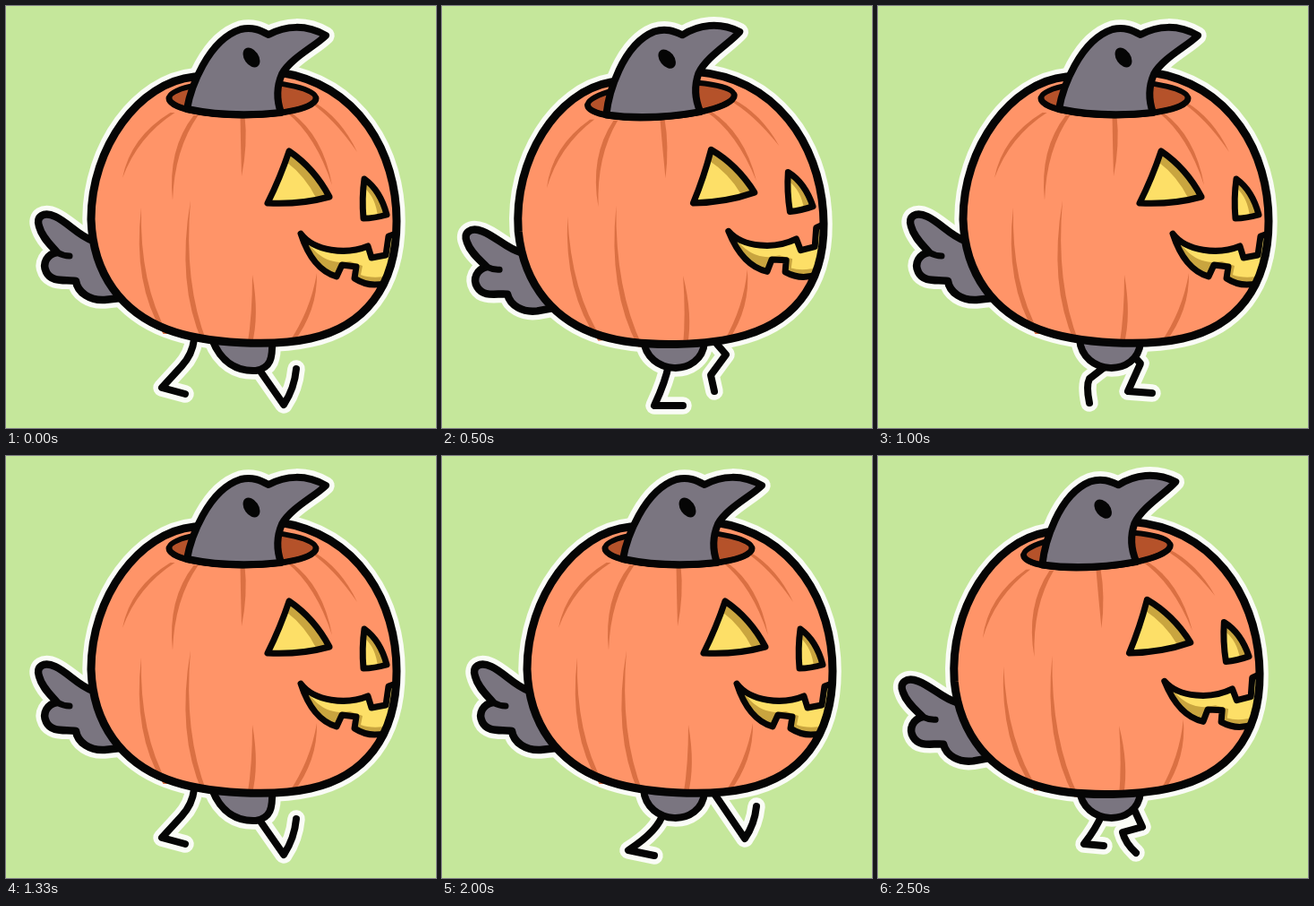
Recreate the animation shown at these times as an HTML page with a canvas. Size 480x471 px, loop 2670 ms.

```html
<!DOCTYPE html>
<html lang="en">
<head>
<meta charset="utf-8">
<title>Walking pumpkin bird</title>
<style>
html, body { margin: 0; width: 100%; height: 100%; overflow: hidden; background: #c5e79b; }
canvas { display: block; }
</style>
</head>
<body>
<canvas id="stage" width="480" height="471"></canvas>
<script>
const ctx = document.getElementById('stage').getContext('2d');
const P = d => new Path2D(d);
const INK = '#050505', GREY = '#7a7580', ORANGE = '#ff9468', CREASE = '#da7043',
  YELLOW = '#fddf67', OCHRE = '#c9a53f', HOLLOW = '#b5522a', WHITE = '#fafcf6';

const body = P('M210 79C149 85 95 157 95 238C97 300 130 342 180 361C225 378 300 380 340 371C399 358 436 315 436 240C436 165 395 88 305 74Z');
const tail = P('M97 262C80 256 70 242 55 235C42 229 33 235 37 246C40 258 50 267 57 275C46 277 40 287 45 297C51 309 66 305 78 307C80 320 94 329 110 328L128 326L150 290Z');
const tailFold = P('M57 275Q64 279 71 279');
const head = P('M202 115C206 92 225 38 262 26C275 23 284 27 293 32C312 22 335 20 357 33C345 45 318 58 308 76C302 90 302 105 307 119Q250 125 202 115Z');
const rim = P('M182 103A82 19 0 0 1 346 103A82 19 0 0 1 182 103Z');
const rimFront = P('M182 103A82 19 0 0 0 346 103');
const mouth = P('M329 254C344 274 380 278 404 268L408 281L424 278L427 257L446 250L446 300L424 309C412 313 400 311 389 304L391 291L375 289L369 302C352 297 338 282 329 254Z');
const mouthShade = P('M329 254C344 274 352 284 372 286L384 285L398 290L396 300Q408 305 430 301L420 315L365 308L338 285Z');
const eyes = [
  ['M316 162Q306 192 292 220Q328 222 361 213Q344 181 316 162Z', 'M316 162Q344 180 361 213L346 214Q334 190 313 174Z'],
  ['M400 193Q418 206 425 233Q411 237 399 237Q397 214 400 193Z', 'M400 193Q418 205 425 234L415 236Q413 214 400 203Z']
].map(pair => pair.map(P));

// tip x,y, bend x,y, base x,y of each rib
const ribs = [
  [130, 192, 143, 146, 186, 119], [186, 217, 184, 160, 212, 122],
  [263, 190, 266, 155, 264, 122], [364, 200, 350, 145, 316, 119],
  [392, 163, 370, 125, 341, 107], [151, 225, 145, 310, 178, 366],
  [206, 217, 194, 310, 222, 376], [275, 300, 279, 345, 272, 378],
  [347, 298, 344, 340, 318, 376]
].map(([x, y, cx, cy, bx, by]) =>
  P(`M${x} ${y}Q${cx - 4} ${cy} ${bx - 2.5} ${by}L${bx + 2.5} ${by}Q${cx + 4} ${cy} ${x} ${y}Z`));

const RUMP = 'M225 372C228 413 290 415 293 375Z';
const RUMP_BACK = 'M217 372C235 407 275 412 292 374Z';
const RUMP_FRONT = 'M230 372C240 398 258 408 279 407C295 404 298 394 297 372Z';

// far leg, near leg, rump for each step of the walk
const walk = [
  ['M210 372Q208 389 196 402L174 426L200 433', 'M280 402L310 445Q322 427 324 405', RUMP_FRONT],
  ['M228 380Q210 398 184 397L180 411L192 430', 'M278 400L291 412L283 446L314 447', RUMP_FRONT],
  ['M247 401L225 401Q219 410 219 428', 'M267 400L266 420L258 445L290 447', RUMP],
  ['M304 374L317 389L300 412L304 430', 'M253 400Q250 418 237 446L269 446', RUMP],
  ['M302 374L338 427Q349 411 351 391', 'M247 398Q242 418 208 440L237 446', RUMP],
  ['M314 384L329 388L319 430L347 430', 'M248 398Q236 414 205 411Q204 427 218 445', RUMP_BACK],
  ['M283 388L293 399L279 430L306 432', 'M258 399L236 416Q232 424 236 443', RUMP],
  ['M250 400Q244 415 230 433L252 435', 'M283 388L295 414L273 420Q276 432 288 443', RUMP]
].map(step => step.map(P));

// upright, leaning forward, upright, leaning back: angle and pivot
const leans = [[0, 0, 0], [4.5, 195, 395], [0, 0, 0], [-4, 285, 385]];

function line(path, width, color = INK) {
  ctx.lineWidth = width;
  ctx.strokeStyle = color;
  ctx.stroke(path);
}
function fill(path, color) {
  ctx.fillStyle = color;
  ctx.fill(path);
}
function shape(path, color, width) {
  fill(path, color);
  line(path, width);
}
function leaned([angle, x, y], paint) {
  ctx.save();
  ctx.translate(x, y);
  ctx.rotate(angle * Math.PI / 180);
  ctx.translate(-x, -y);
  paint();
  ctx.restore();
}
function clipped(path, paint) {
  ctx.save();
  ctx.clip(path);
  paint();
  ctx.restore();
}

function paintBird() {
  shape(tail, GREY, 8.5);
  line(tailFold, 7);
  fill(body, ORANGE);
  ribs.forEach(rib => fill(rib, CREASE));
  clipped(body, () => {
    fill(mouth, YELLOW);
    clipped(mouth, () => fill(mouthShade, OCHRE));
    line(mouth, 7);
  });
  for (const [eye, shade] of eyes) {
    fill(eye, YELLOW);
    clipped(eye, () => fill(shade, OCHRE));
    line(eye, 7);
  }
  line(body, 9);
  shape(rim, HOLLOW, 6);
  shape(head, GREY, 8);
  line(rimFront, 7);
  ctx.fillStyle = INK;
  ctx.beginPath();
  ctx.ellipse(274, 57.5, 8, 12, -0.6, 0, 7);
  ctx.fill();
}

function draw(step) {
  const [far, near, rump] = walk[step % 8];
  const lean = leans[step % 4];
  ctx.fillStyle = '#c5e79b';
  ctx.fillRect(0, 0, 480, 471);
  ctx.lineCap = ctx.lineJoin = 'round';
  for (const part of [far, near, rump]) line(part, 19.5, WHITE);
  leaned(lean, () => [tail, body, head].forEach(part => line(part, 19.5, WHITE)));
  line(far, 8);
  line(near, 8);
  shape(rump, GREY, 8);
  leaned(lean, paintBird);
}

// six steps a second, on a 10 ms grid
function tick() {
  const t = Math.floor(performance.now() % 2670 / 10);
  draw(Math.floor((t + 0.5) * 0.06));
  requestAnimationFrame(tick);
}
tick();
</script>
</body>
</html>
```
